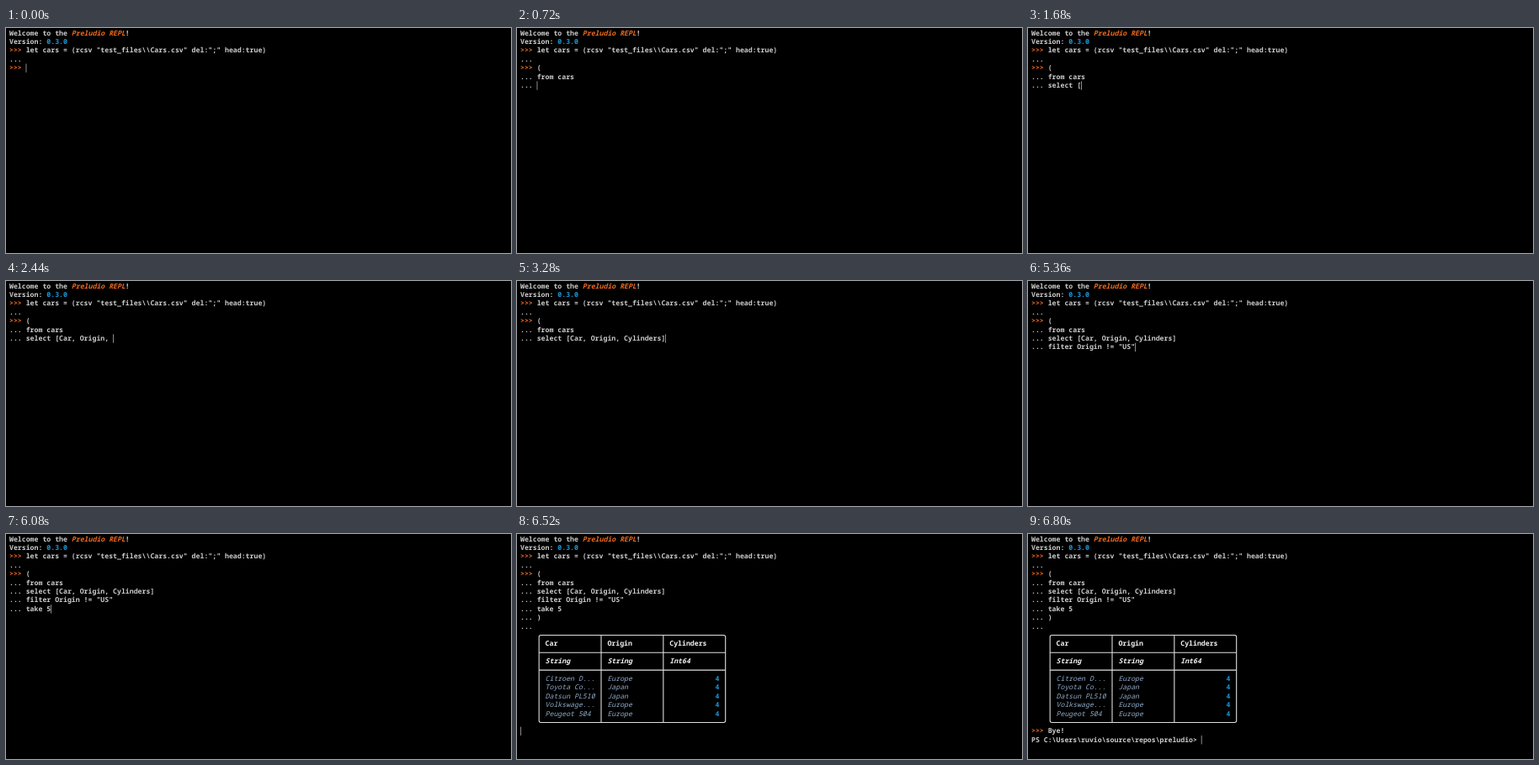
Animation of 600x268 px, one loop 7.4 s. Source, as an HTML page:

```html
<!DOCTYPE html>
<html lang="en">
<head>
<meta charset="utf-8">
<title>REPL session</title>
<style>
html, body { margin: 0; width: 100%; height: 100%; overflow: hidden; background: #000; }
/* The terminal is laid out in 9 x 19 cells, then scaled to the stage. */
#term { position: absolute; left: 4.4px; top: .7px; width: 1080px; height: 480px;
  transform: scale(.547); transform-origin: 0 0; }
pre { margin: 0; color: #ccc; text-rendering: geometricPrecision; font-variant-ligatures: none;
  font: 600 15px/19px "Noto Sans Mono", "DejaVu Sans Mono", monospace; }
b { color: #f2f2f2; }
i { color: #90aac8; font-weight: 500; }
.orange { color: #f06a1e; }
.blue { color: #1898d8; }
svg { position: absolute; left: 0; top: 0; fill: none; stroke: #e0e0e0; stroke-width: 2; }
#cursor { position: absolute; width: 1px; height: 19px; background: #fff; }
</style>
</head>
<body>
<div id="term">
  <pre id="text"></pre>
  <svg id="frame" width="1080" height="480">
    <rect x="40.5" y="218.5" width="405" height="190" rx="4"/>
    <path d="M40.5 256.5h405M40.5 294.5h405M175.5 218.5v190M310.5 218.5v190"/>
  </svg>
  <div id="cursor"></div>
</div>
<script>
const LOOP = 7400, TICK = 40;
const TABLE = 6520, PROMPT = 6600, BYE = 6760, SHELL = 6800;

const $ = id => document.getElementById(id);
const bold = (s, cls = '') => `<b class="${cls}">${s}</b>`;
const prompt = bold('&gt;&gt;&gt; ', 'orange');

const intro = [
  `Welcome to the <em>${bold('Preludio REPL', 'orange')}</em>!`,
  'Version: ' + bold('0.3.0', 'blue'),
  prompt + 'let cars = (rcsv "test_files\\\\Cars.csv" del:";" head:true)',
  '...'
];

const cells = (a, b) => ' '.repeat(6) + a.padEnd(15) + b.padEnd(15);
const cars = [
  ['Citroen D...', 'Europe'], ['Toyota Co...', 'Japan'], ['Datsun PL510', 'Japan'],
  ['Volkswage...', 'Europe'], ['Peugeot 504', 'Europe']
];
const table = [
  '', bold(cells('Car', 'Origin') + 'Cylinders'),
  '', `<em>${bold(cells('String', 'String') + 'Int64')}</em>`, '',
  ...cars.map(c => `<i>${cells(...c)}</i>` + bold('4'.padStart(12), 'blue')), ''
];
const shell = 'PS C:\\Users\\ruvio\\source\\repos\\preludio> ';

// Typing bursts: keys, time of the first one, time of the last one.
const bursts = [
  ['(\nfrom', 40, 240], [' cars\n', 400, 720],
  ['sele', 1240], ['ct ', 1440, 1480], ['[', 1680], ['Car, Origin', 1880, 2160],
  [', ', 2440], ['Cylinders', 2640, 3040], [']', 3280], ['\n', 3520],
  ['filter Ori', 3960, 4200], ['gin ', 4400, 4440], ['!', 4640],
  ['= "US', 4960, 5080], ['"\n', 5360, 5480],
  ['take ', 5800, 5920], ['5\n)', 6080, 6280], ['\n', 6440]
];

// Keys of a burst are evenly spaced and appear on the screen's next tick.
function typedAt(t) {
  let out = '';
  for (const [keys, start, end = start] of bursts) {
    const gap = (end - start) / Math.max(1, keys.length - 1);
    [...keys].forEach((key, i) => {
      if (t >= Math.floor((start + gap * i) / TICK) * TICK) out += key;
    });
  }
  return out;
}

function draw(t) {
  const typed = typedAt(t).split('\n');
  const lines = [...intro, ...typed.map((s, i) => (i ? '... ' : prompt) + s)];
  let row = lines.length - 1, col = 4 + typed[typed.length - 1].length;
  if (t >= TABLE) {
    lines.push(...table);
    row = lines.length + (t >= BYE);
    col = t >= SHELL ? shell.length : t >= PROMPT && t < BYE ? 4 : 0;
    if (t >= PROMPT) lines.push(prompt + (t >= BYE ? 'Bye!' : ''));
    if (t >= SHELL) lines.push(shell);
  }
  $('text').innerHTML = lines.join('\n');
  $('frame').style.display = t >= TABLE ? '' : 'none';
  $('cursor').style.left = col * 9 + 'px';
  $('cursor').style.top = row * 19 + 'px';
}

function tick() {
  draw(performance.now() % LOOP);
  requestAnimationFrame(tick);
}
tick();
</script>
</body>
</html>
```
